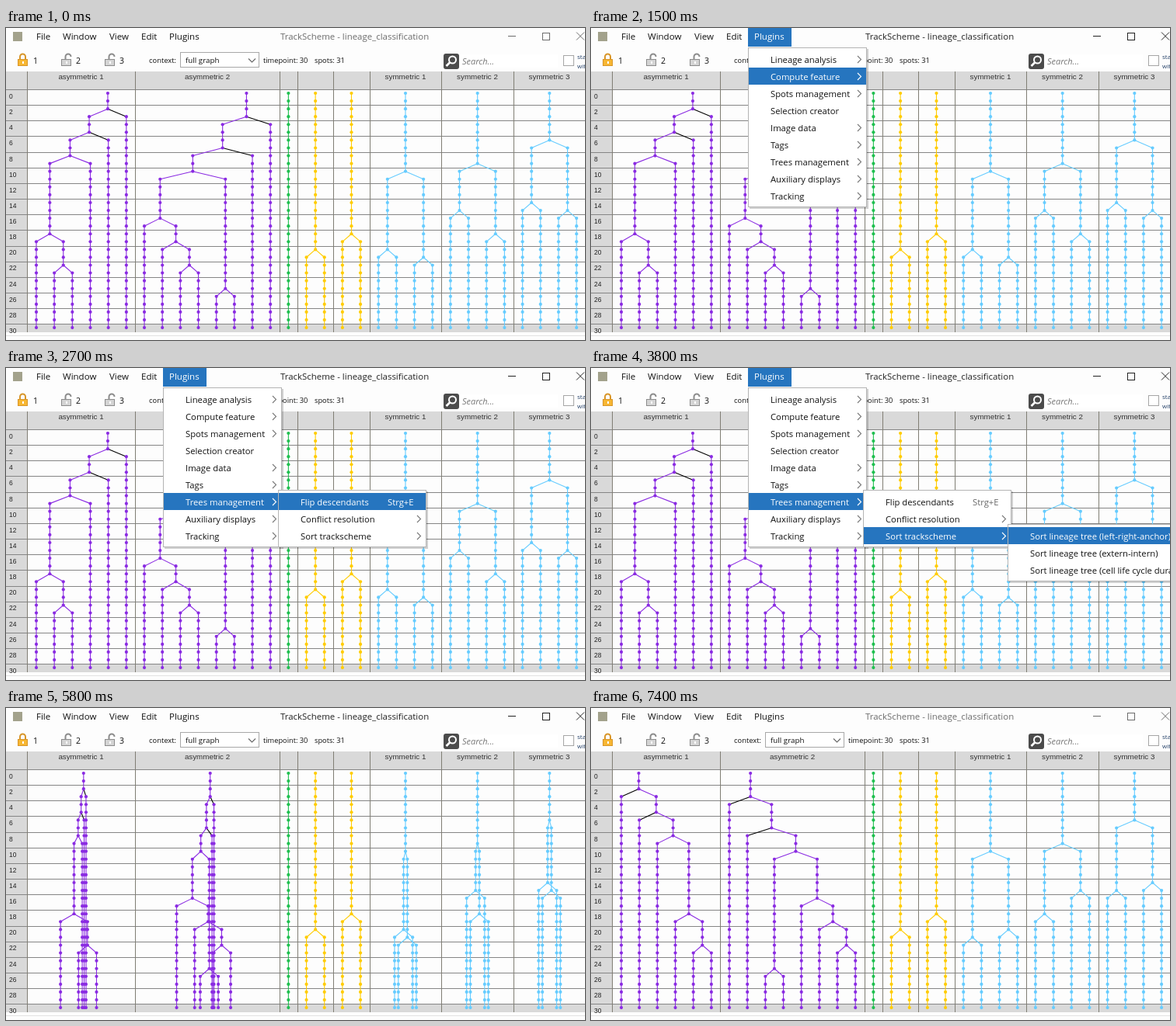
An HTML page with a canvas that plays this animation: 745 px wide and 402 px high, repeating every 7500 ms.

```html
<!DOCTYPE html>
<html lang="en">
<head>
<meta charset="utf-8">
<title>TrackScheme</title>
<style>
  html, body { margin: 0; width: 100%; height: 100%; overflow: hidden; background: #fdfdfd; }
  canvas { display: block; }
</style>
</head>
<body>
<canvas id="stage" width="745" height="402"></canvas>
<script>
const g = document.getElementById('stage').getContext('2d');
const LOOP = 7500, BLUE = '#2675bf';
const UI = '"Open Sans", "Noto Sans", sans-serif', ARIAL = '"Liberation Sans", Arial, sans-serif';
const LEAF_GAP = 23.17, LAST = 30;

// Lineages: [last timepoint, left, right, order]; 0 is an undivided branch.
// order 1: daughters swap when sorted; 2: they swap and the right link is black.
const PURPLE = '#8a2be2', GREEN = '#1fbf4f', YELLOW = '#ffcc00', SKY = '#66ccff';
const lineages = [
  ['asymmetric 1', PURPLE, [2, [5, [8, [18, 0, [22, 0, 0]], 0, 1], 0, 2], 0, 2]],
  ['asymmetric 2', PURPLE, [3, [7, [10, [16, 0, [19, 0, [22, 0, 0]]], [25, 0, 0], 1], 0, 2], 0, 2]],
  ['', GREEN, 0],
  ['', YELLOW, [20, 0, 0]],
  ['', YELLOW, [18, 0, 0]],
  ['symmetric 1', SKY, [10, [20, 0, 0], [21, 0, 0], 1]],
  ['symmetric 2', SKY, [9, [15, 0, 0], [18, 0, 0], 1]],
  ['symmetric 3', SKY, [6, [14, 0, 0], [15, 0, 0], 1]]
].map(([name, color, spec]) => ({ name, color, root: build(spec) }));

function build(spec) {
  if (!spec) return { end: LAST, kids: [], order: 0, x: [] };
  const [end, a, b, order = 0] = spec;
  return { end, kids: [build(a), build(b)], order, x: [] };
}

let leaf;
function place(node, sorted) {
  const kids = sorted && node.order ? [...node.kids].reverse() : node.kids;
  kids.forEach(k => place(k, sorted));
  node.x[sorted] = kids.length
    ? (kids[0].x[sorted] + kids[1].x[sorted]) / 2
    : 39 + LEAF_GAP * leaf++;
}
const edges = [];
for (const sorted of [0, 1]) {
  leaf = 0;
  lineages.forEach((l, i) => {
    edges[i] = Math.round(27.4 + LEAF_GAP * leaf);
    place(l.root, sorted);
  });
}

const rowY = k => 84 + 10.07 * k;

// Latest value in [time, value, time, value, ...]
function at(t, steps) {
  let v = steps[1];
  for (let i = 0; i < steps.length; i += 2) if (t >= steps[i]) v = steps[i + 1];
  return v;
}

function box(x, y, w, h, color) {
  g.fillStyle = color;
  g.fillRect(x, y, w, h);
}

function frame(x, y, w, h, color) {
  g.strokeStyle = color;
  g.lineWidth = 1;
  g.strokeRect(x + .5, y + .5, w - 1, h - 1);
}

function path(color, width, ...pts) {
  g.strokeStyle = color;
  g.lineWidth = width;
  g.beginPath();
  for (let i = 0; i < pts.length; i += 2) g.lineTo(pts[i], pts[i + 1]);
  g.stroke();
}

function text(str, x, y, size, color = '#111', font = UI, style = '') {
  g.font = `${style} ${size}px ${font}`;
  g.fillStyle = color;
  g.fillText(str, x, y);
}

function lock(x, color, shackle, open) {
  const sx = x + (open ? 9 : 6.5);
  g.strokeStyle = shackle;
  g.lineWidth = 2;
  g.beginPath();
  g.moveTo(sx - 3.5, 40);
  g.arc(sx, 37, 3.5, Math.PI, 0);
  if (!open) g.lineTo(sx + 3.5, 40);
  g.stroke();
  box(x, 40, 13, 9, color);
  frame(x, 40, 13, 9, shackle);
  box(x + 6, 43, 2, 3, '#fff');
}

function titleBar(t) {
  const ink = t >= 500 && t < 7400 ? '#222' : '#6c6c6c';
  box(9, 5, 12, 12, '#a3a28c');
  const open = t >= 500 && t < 5800;
  if (open) box(202, 0, 56, 24, BLUE);
  [['File', 39], ['Window', 73], ['View', 133], ['Edit', 174], ['Plugins', 210]].forEach(([s, x]) =>
    text(s, x, 15, 11.5, open && s === 'Plugins' ? '#fff' : '#111'));
  text('TrackScheme - lineage_classification', 353, 15, 11.45, ink);
  box(646, 10, 10, 1, ink);
  frame(690, 6, 10, 10, ink);
  path(ink, 1, 734, 5.5, 744, 15.5);
  path(ink, 1, 734, 15.5, 744, 5.5);
}

function toolBar(t) {
  lock(15, '#f7b733', '#d8962a', false);
  lock(71, '#d4d4d4', '#8c8c8c', true);
  lock(127, '#d4d4d4', '#8c8c8c', true);
  [35, 90, 146].forEach((x, i) => text(i + 1, x, 46, 10.5));
  text('context:', 184, 45, 9.4);
  box(224, 31, 102, 20, '#fff');
  frame(224, 31, 102, 20, '#a8a8a8');
  text('full graph', 231, 45, 9.8);
  path(t >= 200 && t < 300 ? '#a0a0a0' : '#666', 1.1, 312, 39.5, 316.5, 44, 321, 39.5);
  text('timepoint: 30', 331, 45, 9.25);
  text('spots: 31', 397, 45, 9.25);

  g.fillStyle = '#4b4b4b';
  g.beginPath();
  g.roundRect(563, 33, 20, 20, 3);
  g.fill();
  g.strokeStyle = '#fff';
  g.lineWidth = 2;
  g.beginPath();
  g.arc(574.5, 41, 4.5, 0, 7);
  g.stroke();
  path('#fff', 2.6, 571, 44.5, 566.5, 49);
  box(583, 34, 127, 17, '#fff');
  text('Search...', 587, 47, 11, '#777', UI, 'italic');
  box(717, 35, 14, 14, '#fff');
  frame(717, 35, 14, 14, '#a6a6a6');
  text('start', 735, 40, 8, '#26426a');
  text('with', 735, 52, 8, '#26426a');
}

function branch(node, start, x, color, p) {
  path(color, 1.1, x, rowY(start), x, rowY(node.end));
  node.kids.forEach((kid, i) => {
    const kx = kid.x[0] + (kid.x[1] - kid.x[0]) * p;
    path(node.order === 2 && i ? '#000' : color, 1.1, x, rowY(node.end), kx, rowY(node.end + 1));
    branch(kid, node.end + 1, kx, color, p);
  });
  g.fillStyle = color;
  for (let k = start; k <= node.end; k++) {
    g.beginPath();
    g.arc(x, rowY(k), 2.1, 0, 7);
    g.fill();
  }
}

function graph(p) {
  box(0, 56, 745, 23, '#d9d9d9');
  box(0, 79, 27, 313, '#d9d9d9');
  box(0, 381, 745, 11, '#d9d9d9');
  box(0, 396, 745, 1, '#e2e2e2');
  for (let j = 0; j <= 15; j++) {
    box(0, Math.round(79 + 20.15 * j), 745, 1, '#858585');
    text(2 * j, 4, 91 + 20.13 * j, 8.5, '#222', ARIAL);
  }
  edges.forEach(x => box(x, 56, 1, 336, '#807e74'));
  g.textAlign = 'center';
  lineages.forEach((l, i) => {
    text(l.name, (edges[i] + (edges[i + 1] || 745)) / 2, 66, 9.8, '#333', ARIAL);
  });
  g.textAlign = 'left';
  for (const { root, color } of lineages)
    branch(root, 0, root.x[0] + (root.x[1] - root.x[0]) * p, color, p);
}

// A trailing ">" marks an entry with a submenu; a tab precedes a shortcut.
function menu(x, y, w, items, active) {
  const h = items.length * 22 + 8;
  box(x + 2, y + 2, w, h, 'rgba(0,0,0,.18)');
  box(x, y, w, h, '#fff');
  frame(x, y, w, h, '#b4b4b4');
  items.forEach((item, i) => {
    const top = y + 4 + 22 * i, on = i === active;
    const [label, key] = item.replace('>', '').split('\t');
    if (on) box(x + 1, top, w - 2, 22, BLUE);
    text(label, x + 29, top + 16, 11.25, on ? '#fff' : '#111');
    if (key) text(key, x + 141, top + 16, 11.25, on ? '#fff' : '#666');
    if (item.endsWith('>')) {
      const ax = x + w - 12, ay = top + 11.5;
      path(on ? '#fff' : '#777', 1.1, ax, ay - 4.5, ax + 4.5, ay, ax, ay + 4.5);
    }
  });
}

function menus(t) {
  if (t < 600 || t >= 5800) return;
  menu(202, 25, 153, ['Lineage analysis>', 'Compute feature>', 'Spots management>', 'Selection creator',
    'Image data>', 'Tags>', 'Trees management>', 'Auxiliary displays>', 'Tracking>'],
    at(t, [0, -1, 1500, 1, 1600, 2, 1700, 4, 1800, 5, 2100, 6]));
  if (t >= 2300) menu(350, 157, 191, ['Flip descendants\tStrg+E', 'Conflict resolution>', 'Sort trackscheme>'],
    at(t, [0, -1, 2700, 0, 2800, 1, 3000, 2]));
  if (t >= 3200) menu(536, 201, 260, ['Sort lineage tree (left-right-anchor)',
    'Sort lineage tree (extern-intern)', 'Sort lineage tree (cell life cycle duration)'],
    at(t, [0, -1, 3800, 0, 3900, 1, 4600, 2]));
}

function draw(now) {
  const t = (now - began) % LOOP;
  box(0, 0, 745, 402, '#fdfdfd');
  graph(at(t, [0, 0, 5800, .448, 5900, .93, 6000, 1]));
  titleBar(t);
  toolBar(t);
  menus(t);
}

const began = performance.now();
function tick() {
  draw(performance.now());
  requestAnimationFrame(tick);
}
tick();
</script>
</body>
</html>
```
